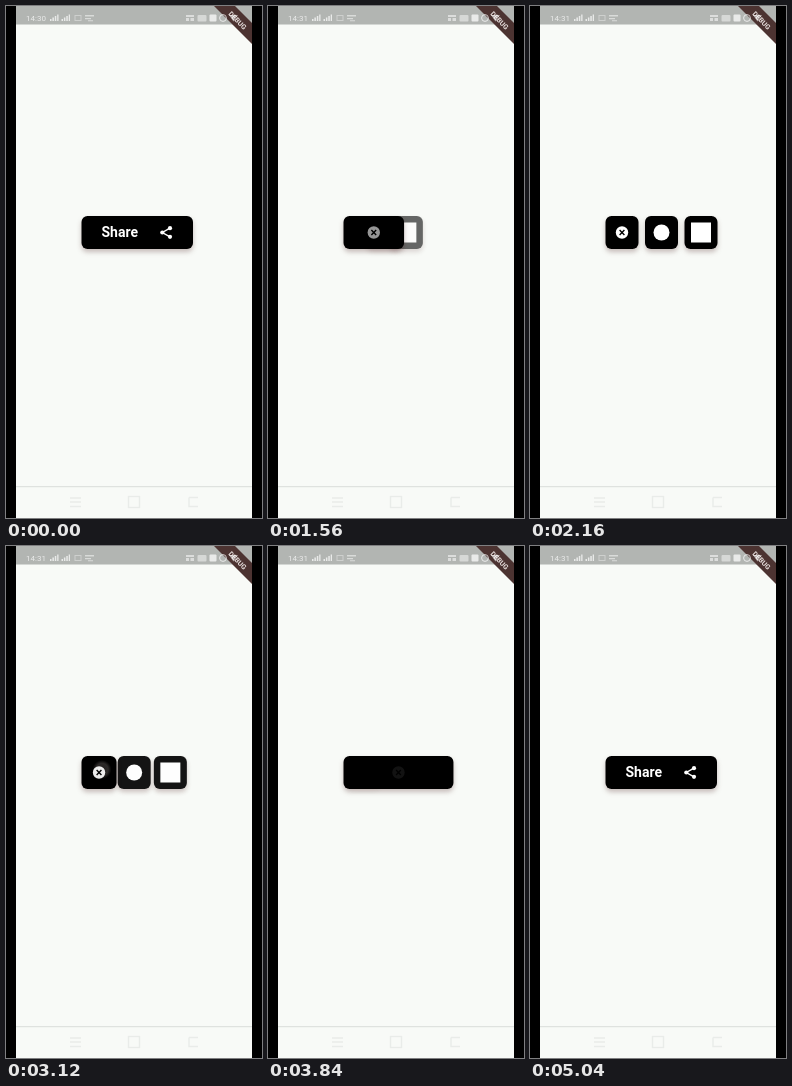
An HTML page for the animation above (5.16 s loop, 256 px wide and 512 px high).

```html
<!DOCTYPE html>
<html lang="en">
<head>
<meta charset="utf-8">
<title>Share button</title>
<style>
  html, body { margin: 0; width: 100%; height: 100%; overflow: hidden; background: #000; }
  svg { display: block; width: 256px; height: 512px; font-family: Roboto, sans-serif; }
  .card { filter: drop-shadow(0 3px 2.5px rgba(70, 25, 25, .28)); }
  .label { font-size: 14px; font-weight: 700; fill: #fff; }
  .status { fill: #fff; stroke: none; opacity: .72; }
  .outline { fill: none; stroke: #fff; stroke-width: 1; }
  .nav { fill: none; stroke: #e9ece9; stroke-width: 1.4; }
</style>
</head>
<body>
<svg viewBox="0 0 256 512">
  <defs>
    <clipPath id="screen"><rect x="10" width="236" height="512"/></clipPath>
    <radialGradient id="dot">
      <stop offset="0" stop-color="#8a7f7c"/>
      <stop offset=".65" stop-color="#b0a5a2"/>
      <stop offset="1" stop-color="#8f8582" stop-opacity="0"/>
    </radialGradient>
  </defs>

  <g clip-path="url(#screen)">
    <rect x="10" width="236" height="512" fill="#f8faf7"/>
    <rect x="10" width="236" height="18.5" fill="#b2b5b2"/>

    <!-- debug ribbon -->
    <path d="M208 0H229L246 17V38Z" fill="#4c3331"/>
    <text transform="translate(231.5 14.5) rotate(45)" text-anchor="middle" y="2.4"
          font-size="7" font-weight="700" fill="#e9e1df">DEBUG</text>

    <!-- status bar -->
    <g class="status">
      <text id="clock" x="20" y="15" font-size="8">14:30</text>
      <g id="bars"><path d="M44 15v-2h1.5v2zM46.4 15v-3.5h1.5v3.5zM48.8 15v-5h1.5v5zM51.2 15v-6.5h1.3v6.5z"/></g>
      <use href="#bars" x="11.5"/>
      <rect class="outline" x="69" y="9.5" width="6" height="5" opacity=".5"/>
      <path d="M79 9h9v1.5h-9zM79 12h6v1.3h-6zM82 14.2h5v1h-5z" opacity=".7"/>
      <path d="M180 9h8v2h-8zM180 12h3v3h-3zM184.500 12h3.500v3h-3.500z" opacity=".75"/>
      <rect x="191.500" y="9" width="9" height="6.500" rx="1" opacity=".65"/>
      <rect x="203.500" y="8.500" width="7" height="7" rx="1"/>
      <circle class="outline" cx="217" cy="12" r="3.400"/>
      <path d="M223 9h9l-4.500 6.500z" opacity=".75"/>
    </g>

    <!-- navigation bar -->
    <path d="M10 480.700H246" stroke="#dfe2df" stroke-width="1.300"/>
    <g class="nav">
      <path d="M64 492h11M64 496h11M64 500.500h11"/>
      <rect x="122.500" y="490.500" width="11" height="11"/>
      <path d="M183 491.500h9M183 491.500v9h9"/>
    </g>

    <!-- social tiles -->
    <g id="tile1">
      <rect class="card" x="75.500" y="210" width="33" height="33" rx="6"/>
      <circle cx="92" cy="226.500" r="8" fill="#fff"/>
    </g>
    <g id="tile2">
      <rect class="card" x="75.500" y="210" width="33" height="33" rx="6"/>
      <rect x="82" y="216.500" width="20" height="20" fill="#fff"/>
    </g>

    <!-- share button -->
    <rect id="box" class="card" x="75.500" y="210" width="111.500" height="33" rx="6"/>
    <g id="share">
      <text class="label" x="95.500" y="231">Share</text>
      <path d="M164 222.200L156.300 226.500L164 230.800" fill="none" stroke="#fff" stroke-width="1.400"/>
      <g fill="#fff">
        <circle cx="164" cy="222.200" r="2.100"/>
        <circle cx="156.300" cy="226.500" r="2.100"/>
        <circle cx="164" cy="230.800" r="2.100"/>
      </g>
    </g>
    <circle id="touch" r="9.500" fill="url(#dot)"/>
    <g id="close">
      <circle r="6.200" fill="#fff"/>
      <path d="M-2.400-2.400L2.400 2.400M2.400-2.400L-2.400 2.400" stroke="#000" stroke-width="1.400"/>
    </g>
  </g>
</svg>

<script>
  const LOOP = 5160, TICK = 120;
  const LEFT = 75.5, WIDE = 111.5, NARROW = 33, GAP = 39.5;
  const $ = id => document.getElementById(id);

  const clamp = x => Math.min(1, Math.max(0, x));
  const span = (t, from, to) => clamp((t - from) / (to - from));
  const cubic = x => x < .5 ? 4 * x ** 3 : 1 - 4 * (1 - x) ** 3;
  const sine = x => (1 - Math.cos(Math.PI * x)) / 2;

  const move = (el, x, y = 0) => el.setAttribute('transform', `translate(${x} ${y})`);
  const fade = (el, a) => el.setAttribute('opacity', a);

  const taps = [
    { x: 124, y: 223, from: 840, to: 1200 },
    { x: 96, y: 223.5, from: 2760, to: 3180 }
  ];

  const box = $('box'), share = $('share'), close = $('close'), touch = $('touch');
  const tiles = [$('tile1'), $('tile2')];
  const clock = $('clock');

  function draw(t) {
    const opening = span(t, 960, 2040), closing = span(t, 2910, 4031);
    const shrink = cubic(opening) - cubic(closing);
    const slide = sine(opening) - sine(closing);

    const width = WIDE + (NARROW - WIDE) * shrink;
    box.setAttribute('width', width);
    move(close, LEFT + width / 2, 226.5);
    fade(close, slide);
    tiles.forEach((tile, i) => {
      move(tile, GAP * (i + 1) * slide);
      fade(tile, slide);
    });
    fade(share, 1 - span(t, 840, 1080) + span(t, 3840, 4080));

    const tap = taps.find(k => t >= k.from && t < k.to);
    fade(touch, tap ? clamp((tap.to - t) / 240) : 0);
    if (tap) move(touch, tap.x, tap.y);

    clock.textContent = t < 1320 ? '14:30' : '14:31';
  }

  function run() {
    const t = performance.now() % LOOP;
    draw(Math.floor(t / TICK) * TICK);
    requestAnimationFrame(run);
  }
  run();
</script>
</body>
</html>
```
